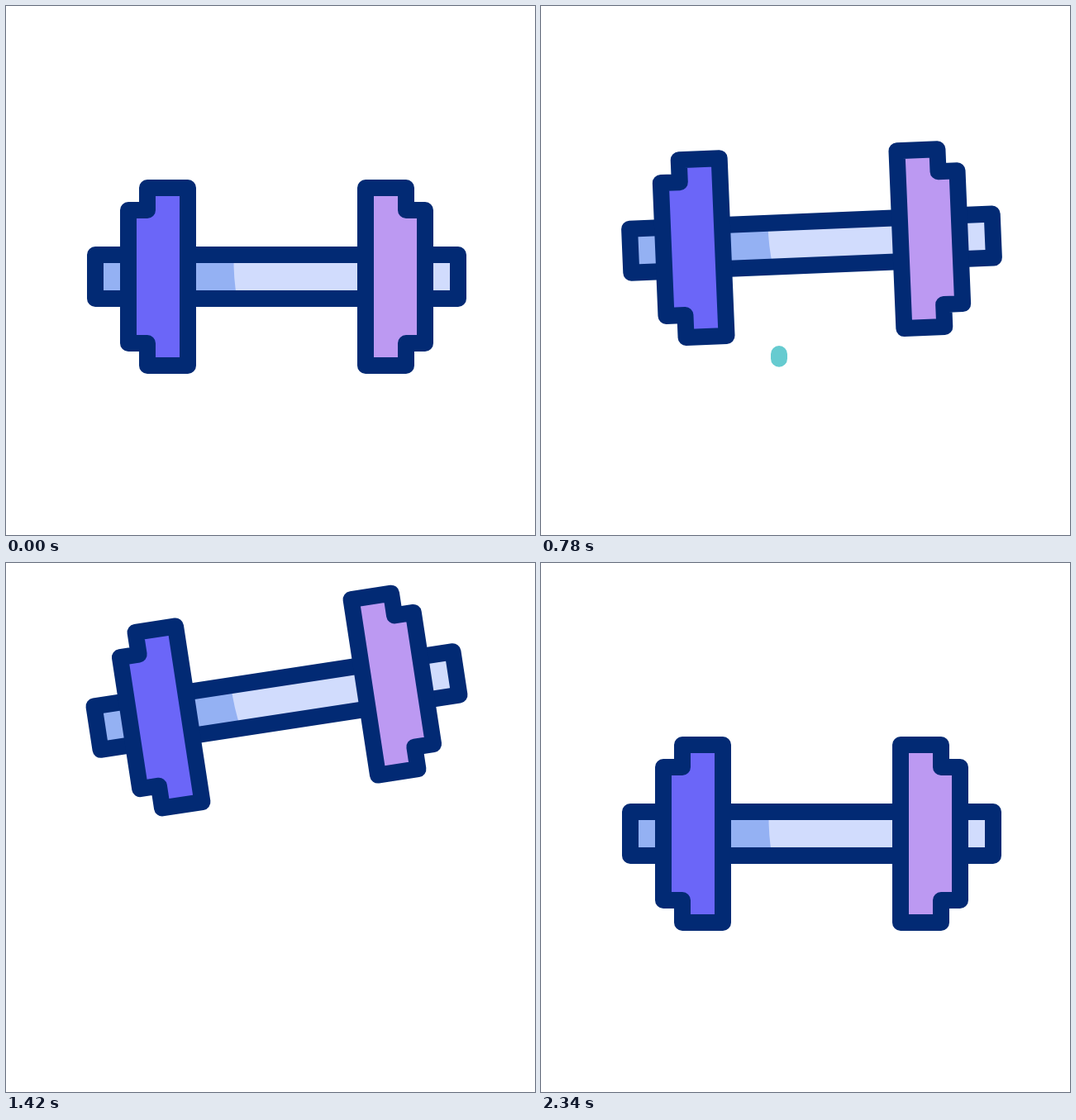
An HTML page with a canvas for the animation above (2.4 s loop, 640 px wide and 640 px high).

```html
<!DOCTYPE html>
<html lang="en">
<head>
<meta charset="utf-8">
<title>Dumbbell</title>
<style>
  html, body { margin: 0; width: 100%; height: 100%; overflow: hidden; background: #fff; }
  canvas { display: block; width: 100vmin; height: 100vmin; }
</style>
</head>
<body>
<canvas width="640" height="640"></canvas>
<script>
const LOOP = 2400, STEP = 20, CENTER = 327.5;
const NAVY = '#022a74', TEAL = '#66cbd0', LIGHT = '#d1dcfd', SHADE = '#94b1f3';
const VIOLET = '#6b66f8', LILAC = '#bc99f2';
const ctx = document.querySelector('canvas').getContext('2d');

const RISE = [[120, 0], [460, 24], [600, 17], [940, -104], [1180, -155], [1330, -170]];
const TILT = [[600, 0], [940, -5.3], [1180, -7.5], [1390, -8.9], [1820, 7.2], [2050, -2.9], [2340, 0]];
const PEAK = 1330, LANDING = 1720;

const STREAKS = [
  { x: 288, top: 421, start: 742 },
  { x: 327.5, top: 422, start: 838 },
  { x: 367, top: 418, start: 879 }
];
const STREAK_BOTTOM = 506;

const clamp01 = v => Math.min(1, Math.max(0, v));
const smooth = v => { const u = clamp01(v); return u * u * (3 - 2 * u); };

// Monotone cubic curve through [time, value] keys, flat at both ends and at turning points.
function track(keys, t) {
  const last = keys.length - 1;
  if (t <= keys[0][0]) return keys[0][1];
  if (t >= keys[last][0]) return keys[last][1];
  const slope = i => (keys[i + 1][1] - keys[i][1]) / (keys[i + 1][0] - keys[i][0]);
  const tangent = i => {
    if (i === 0 || i === last) return 0;
    const a = slope(i - 1), b = slope(i);
    return a * b <= 0 ? 0 : 2 * a * b / (a + b);
  };
  let i = 0;
  while (t > keys[i + 1][0]) i++;
  const [t0, v0] = keys[i], [t1, v1] = keys[i + 1];
  const span = t1 - t0, u = (t - t0) / span, s = smooth(u);
  return v0 + (v1 - v0) * s
    + span * u * (1 - u) * ((1 - u) * tangent(i) - u * tangent(i + 1));
}

function height(t) {
  if (t <= PEAK) return track(RISE, t);
  const fall = clamp01((t - PEAK) / (LANDING - PEAK));
  return -170 * (1 - fall * fall);
}

function drawStreaks(t) {
  ctx.strokeStyle = TEAL;
  for (const { x, top, start } of STREAKS) {
    const head = smooth((t - start) / 240);
    const tail = smooth((t - start - 200) / 220);
    if (head <= tail) continue;
    const length = STREAK_BOTTOM - top;
    ctx.beginPath();
    ctx.moveTo(x, top + length * tail);
    ctx.lineTo(x, top + length * head);
    ctx.stroke();
  }
}

function drawHandle() {
  ctx.fillStyle = LIGHT;
  ctx.fillRect(-219.5, -26.5, 439, 53);
  ctx.fillStyle = SHADE;
  ctx.beginPath();
  ctx.moveTo(-219.5, -26.5);
  ctx.lineTo(-52, -26.5);
  ctx.quadraticCurveTo(-52.5, 2, -48, 26.5);
  ctx.lineTo(-219.5, 26.5);
  ctx.fill();
  ctx.strokeRect(-219.5, -26.5, 439, 53);
}

function drawPlate(side, color) {
  const outline = [[107.5, -107.5], [156.5, -107.5], [156.5, -80.5], [179.5, -80.5]];
  const mirrored = outline.map(([x, y]) => [x, -y]).reverse();
  ctx.beginPath();
  for (const [x, y] of [...outline, ...mirrored]) ctx.lineTo(side * x, y);
  ctx.closePath();
  ctx.fillStyle = color;
  ctx.fill();
  ctx.stroke();
}

function draw(t) {
  ctx.fillStyle = '#fff';
  ctx.fillRect(0, 0, 640, 640);
  ctx.lineWidth = 20;
  ctx.lineCap = ctx.lineJoin = 'round';
  drawStreaks(t);

  ctx.save();
  ctx.translate(CENTER, CENTER + height(t));
  ctx.rotate(track(TILT, t) * Math.PI / 180);
  ctx.strokeStyle = NAVY;
  drawHandle();
  drawPlate(-1, VIOLET);
  drawPlate(1, LILAC);
  ctx.restore();
}

const origin = performance.now();
function tick() {
  const t = (performance.now() - origin) % LOOP;
  draw(Math.floor(t / STEP) * STEP);
  requestAnimationFrame(tick);
}
tick();
</script>
</body>
</html>
```
